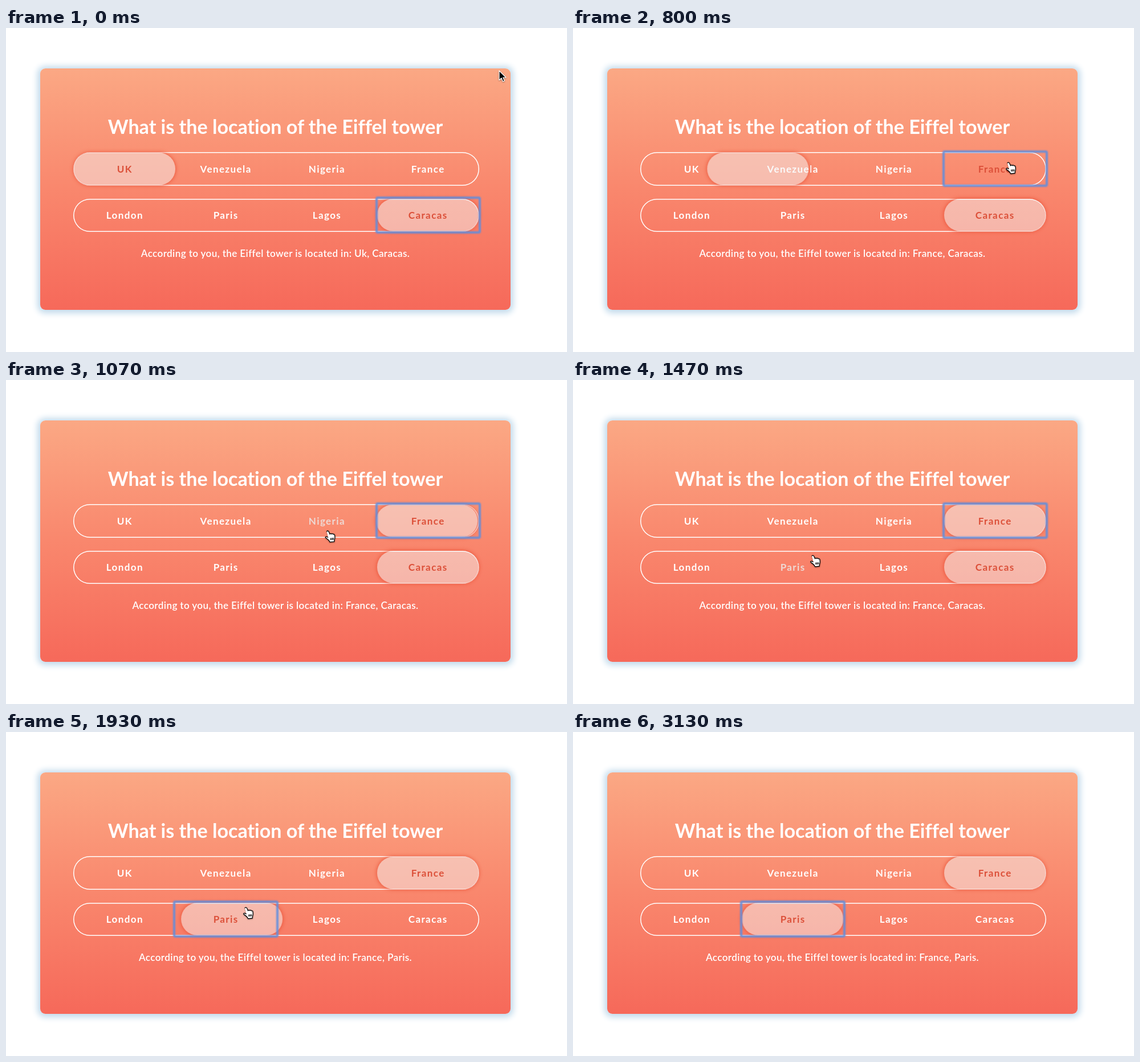
An HTML page for the animation above (3.19 s loop, 984 by 569 pixels).

```html
<!DOCTYPE html>
<html lang="en">
<head>
<meta charset="utf-8">
<title>Location quiz</title>
<style>
  html, body { margin: 0; width: 100%; height: 100%; overflow: hidden; background: #fff; }
  body {
    position: relative; color: #fff; font: 600 17px Lato, 'Open Sans', sans-serif;
    font-variant-ligatures: none;
  }
  div, svg { position: absolute; box-sizing: border-box; white-space: nowrap; }
  .card {
    left: 60px; top: 71px; width: 825px; height: 423.5px; border-radius: 9px;
    background: linear-gradient(#fba884, #f9876d 50%, #f6695a);
    box-shadow: 0 1px 11px 5px #c3dbec;
  }
  .line { left: 60px; width: 825px; text-align: center; }
  .title { top: 152.6px; line-height: 40px; font-size: 34.1px; font-weight: 700; }
  .answer { top: 386px; line-height: 20px; font-size: 17.1px; letter-spacing: .38px; }
  .row {
    left: 118.2px; width: 711.6px; height: 58.4px; border-radius: 29.2px;
    box-shadow: inset 0 0 0 1.5px #fff;
  }
  .label {
    width: 177.3px; height: 57px; line-height: 57px; font-weight: 700;
    text-align: center; text-indent: 1.4px; letter-spacing: 1.4px;
  }
  .hover { color: #eed9d4; }
  .chosen { color: #dc5039; z-index: 2; }
  .pill {
    width: 178px; height: 57px; border-radius: 28.5px; z-index: 1;
    background: rgba(245, 245, 245, .48); box-shadow: 0 0 6px 1px rgba(232, 78, 50, .8);
  }
  .ring {
    width: 185px; height: 64.5px; border: 4px solid #5f8ede; border-radius: 4px;
    z-index: 3; opacity: .9; filter: blur(.9px);
  }
  svg { left: 0; top: 0; overflow: visible; z-index: 4; filter: drop-shadow(0 1px 1px rgba(0, 0, 0, .35)); }
</style>
</head>
<body>
<div class="card"></div>
<div class="line title">What is the location of the Eiffel tower</div>
<div class="line answer"></div>
<div class="ring"></div>
<svg width="1" height="1" stroke-linejoin="round">
  <path id="arrow" fill="#000" stroke="#fff" stroke-width="1.2"
    d="M0 0V16.5L4 13L6.6 19L9.4 17.8L6.8 12H12Z"/>
  <path id="hand" fill="#fff" stroke="#000" stroke-width="1.3" transform="translate(-1 -1)"
    d="M-2 1.5C-2-.3 1-.5 1.6 1.4L3.6 6C4 4.4 6 4.2 6.6 5.8C7.2 4.6 9 4.6 9.6 6.2C10.6 5.4 12 6 12 8C12.6 11 12.6 13 11.6 15L11.2 19L3.6 19.8C2.6 17-.6 14.5-3.6 12.4C-5 11-3.6 9.6-1.8 10.4L.6 11.6M5 12.5V16M7.3 12.3V16M9.5 12.2V15.8"/>
</svg>
<script>
const LOOP = 3190, STEP = 200 / 3, SLIDE = 350, CURSOR_GONE = 2065;
const LEFT = 119, WIDTH = 177.3, HEIGHT = 57;
const $ = s => document.querySelector(s);
const answer = $('.answer'), ring = $('.ring'), cursor = $('svg'), arrow = $('#arrow'), hand = $('#hand');

const rows = [
  { top: 219, names: ['UK', 'Venezuela', 'Nigeria', 'France'], from: 0, to: 3, click: 742 },
  { top: 300.3, names: ['London', 'Paris', 'Lagos', 'Caracas'], from: 3, to: 1, click: 1661 }
];

const smooth = u => u * u * (3 - 2 * u);
const speedUp = u => u * u;
const slowDown = u => u * (2 - u);

// Cursor stops: time, x, y and the easing used to get there
const path = [
  [0, 865, 75],
  [590, 765, 237, smooth],
  [820, 765, 237, smooth],
  [1067, 565, 266, speedUp],
  [1400, 422, 309, slowDown]
];

function add(cls, x, y, text = '') {
  const el = document.createElement('div');
  el.className = cls;
  el.style.left = x + 'px';
  el.style.top = y + 'px';
  el.textContent = text;
  document.body.append(el);
  return el;
}

const boxX = i => LEFT + WIDTH * i;

for (const row of rows) {
  add('row', 118.2, row.top - .8);
  row.labels = row.names.map((name, i) => add('label', boxX(i), row.top, name));
  const shift = i => ({ transform: `translateX(${WIDTH * i}px)` });
  row.slide = add('pill', LEFT, row.top).animate([shift(row.from), shift(row.to)],
    { duration: SLIDE, delay: row.click, easing: 'ease', fill: 'both' });
  row.slide.pause();
}

function cursorAt(t) {
  const k = path.findIndex(p => p[0] > t);
  if (k < 0) return path[path.length - 1].slice(1, 3);
  const [t0, x0, y0] = path[k - 1], [t1, x1, y1, ease] = path[k];
  const u = ease((t - t0) / (t1 - t0));
  return [x0 + (x1 - x0) * u, y0 + (y1 - y0) * u];
}

function draw(t) {
  const [x, y] = cursorAt(t);
  const shown = t < CURSOR_GONE;
  let over = false;

  for (const row of rows) {
    row.pick = t < row.click ? row.from : row.to;
    row.slide.currentTime = t;
    const inRow = shown && y >= row.top && y <= row.top + HEIGHT;
    row.labels.forEach((label, i) => {
      const hover = inRow && x >= boxX(i) && x < boxX(i + 1);
      over ||= hover;
      label.className = 'label' + (i === row.pick ? ' chosen' : hover ? ' hover' : '');
    });
  }

  const [country, city] = rows.map(r => r.names[r.pick]);
  answer.textContent = 'According to you, the Eiffel tower is located in: ' +
    `${country[0] + country.slice(1).toLowerCase()}, ${city}.`;

  const focus = t >= rows[0].click && t < rows[1].click ? rows[0] : rows[1];
  ring.style.left = boxX(focus.pick) - 3 + 'px';
  ring.style.top = focus.top - 4.2 + 'px';

  cursor.style.display = shown ? '' : 'none';
  cursor.style.transform = `translate(${x}px, ${y}px)`;
  arrow.style.display = over ? 'none' : '';
  hand.style.display = over ? '' : 'none';
}

const start = performance.now();
function tick() {
  const t = (performance.now() - start) % LOOP;
  draw(Math.floor((t + 3.4) / STEP) * STEP);
  requestAnimationFrame(tick);
}
tick();
</script>
</body>
</html>
```
